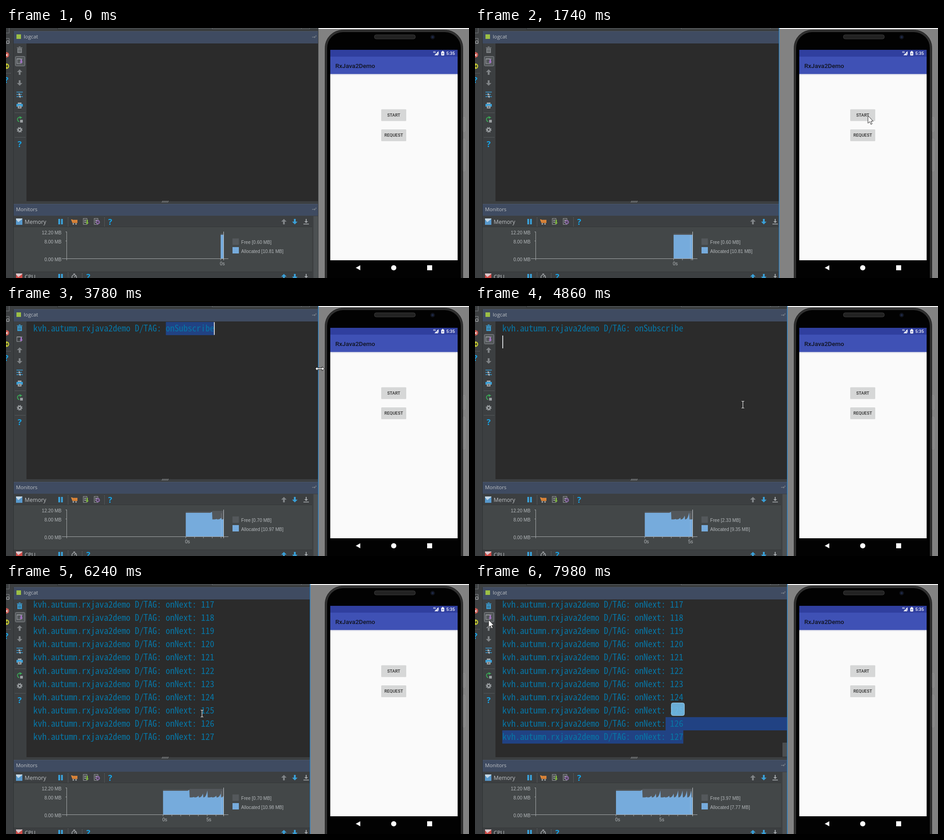
Recreate the animation shown at these times as an HTML page. Size 1018 by 550 pixels, loop 8 s.

```html
<!DOCTYPE html>
<html lang="en">
<head>
<meta charset="utf-8">
<title>Logcat and emulator</title>
<style>
html, body { margin: 0; width: 100%; height: 100%; overflow: hidden; background: #3c3f41; }
svg { display: block; width: 1018px; height: 550px; }
text { white-space: pre; }
.ui { font-family: "Open Sans", "Noto Sans", sans-serif; fill: #bfc3c6; }
.num { font: 10.1px "Liberation Sans", Arial, sans-serif; fill: #b4b8bb; }
.app { font-family: Roboto, sans-serif; font-weight: 500; }
.log { font-family: "Noto Sans Mono CJK SC", "Noto Sans Mono", "Liberation Mono", monospace; fill: #0776a6; }
</style>
</head>
<body>
<svg id="stage" viewBox="0 0 1018 550"></svg>
<script>
const LOOP = 8000, STEP = 60;
const BLUE = '#3a9fd6', GREY = '#7f8386', PALE = '#a4a8ab';
const stage = document.getElementById('stage');

const rect = (x, y, w, h, fill, more = '') =>
  `<rect x="${x}" y="${y}" width="${w}" height="${h}" fill="${fill}" ${more}/>`;
const disc = (x, y, r, fill, more = '') =>
  `<circle cx="${x}" cy="${y}" r="${r}" fill="${fill}" ${more}/>`;
const shape = (d, fill, more = '') => `<path d="${d}" fill="${fill}" ${more}/>`;
const line = (d, color, w = 1, more = '') =>
  `<path d="${d}" fill="none" stroke="${color}" stroke-width="${w}" ${more}/>`;
const text = (x, y, str, cls, more = '') => `<text x="${x}" y="${y}" class="${cls}" ${more}>${str}</text>`;
const at = (x, y, body, more = '') => `<g transform="translate(${x} ${y})" ${more}>${body}</g>`;

// Icons, each drawn around its own centre
const arrow = (x, y, dir, color) =>
  at(x, y, shape('M0-6L6 0H2V6H-2V0H-6Z', color, dir < 0 ? 'transform="scale(1 -1)"' : ''));
const help = (x, y) => text(x, y + 6.5, '?', 'ui',
  `text-anchor="middle" style="fill:#16a4e8;font-weight:700;font-size:18px"`);
const pause = (x, y) => rect(x - 5, y - 6, 4, 12, BLUE) + rect(x + 1, y - 6, 4, 12, BLUE);
const dots = (d) => line(d, '#85898c', 1, 'stroke-dasharray="1 2"');
const hide = (x, y) => at(x, y, line('M-5 0H2M0-2L2 0L0 2M3.5-4V-1', '#8d9398'));
const save = (x, y) => at(x, y, shape('M-1-6H1V-1H4L0 3L-4-1H-1Z', PALE) + line('M-6 5.3H6', PALE, 1.6));
const wave = (x, y, color) =>
  rect(x - 7, y - 7, 14, 14, color) + at(x, y, shape('M-7-5L-2 1L2-2L7-6V-7H-7Z', '#dfe6ec', 'opacity=".8"'));
const sheet = (x, y, extra) => at(x, y,
  rect(-5, -7, 8, 13, 'none', `stroke="${PALE}"`) + rect(-3, -4, 4, 2, PALE) + rect(-3, 0, 4, 2, PALE) + extra);
const trash = at(30, 48,
  line('M-6-4.5H6M-2-6.5H2', 'currentColor', 1.5) + shape('M-5-3H5V7H-5Z', 'currentColor') +
  line('M-2.2-1V5M0-1V5M2.2-1V5', '#3c3f41', .8));

function leftEdge() {
  return rect(0, 0, 16, 550, '#3c3f41') +
    rect(-3, -2, 10, 13, 'none', 'stroke="#777b7e"') +
    rect(-2, 23, 9, 11, 'none', 'stroke="#8a8e91"') + disc(4, 31, 3, '#3c3f41', 'stroke="#c0c3c5"') +
    disc(1, 59, 6, '#c9564e') + line('M-1 57L4 62M4 57L-1 62', '#f2dcda', 1.3) +
    disc(1, 84, 6, '#c3c832') + line('M-2 84H5M3 81V87', '#34372b', 1.5) +
    dots('M0 99.5h11') + help(1, 114);
}

function logTools() {
  return rect(17, 34, 28, 347, '#3c3f41') +
    `<g id="trash">${trash}</g>` +
    rect(20.5, 62.5, 21, 21, '#53575a', 'rx="2" stroke="#888c8f" id="toggle"') +
    at(30, 73, rect(-6, -5, 9, 10, 'none', `stroke="${PALE}"`) + line('M-6-5H6', PALE) +
      shape('M2-4H5V1H7L3.5 5L0 1H2Z', '#a675c8')) +
    arrow(30, 97, 1, GREY) + arrow(30, 121, -1, GREY) +
    at(30, 146, line('M-7-5H7M-7 0H5M-7 5H7', BLUE, 1.6) + shape('M-2-3L2 0L-2 3Z M2 2L-2 5L2 8Z', '#b7bcc0')) +
    at(30, 170, rect(-4, -6, 8, 3, PALE) + rect(-7, -3, 14, 6, BLUE) + rect(-4, 1, 8, 6, PALE) + rect(-2, 3, 4, 2, '#55595c')) +
    dots('M20 186.5h22') +
    at(30, 201, line('M3-4A5 5 0 1 0-1 5', '#3aa655', 2) + shape('M0-7L6-4L0-1Z', '#3aa655') + rect(1, 1, 6, 6, '#9a9ea1')) +
    at(30, 224, disc(0, 0, 3.3, 'none', 'stroke="#9da1a4" stroke-width="2.6"') +
      disc(0, 0, 5.3, 'none', 'stroke="#9da1a4" stroke-width="2" stroke-dasharray="2 2.16"')) +
    dots('M20 240.5h22') + help(30, 255);
}

function header(y, name, color, arrowColor) {
  return wave(29, y, color) + text(41, y + 4.8, name, 'ui', 'font-size="12.1"') + pause(120, y) +
    dots(`M136.5 ${y - 9}v19`) + arrow(611, y, 1, arrowColor) + arrow(635, y, -1, BLUE) + save(660, y);
}

function chart() {
  const scale = [['12.20', 454], ['8.00', 473.5], ['0.00', 512.5]];
  return scale.map(([mb, y]) => text(122, y, mb + ' MB', 'num', 'text-anchor="end"')).join('') +
    '<g clip-path="url(#plot)"><path id="free" fill="#53575b"/><path id="alloc" fill="#76abdc"/></g>' +
    line('M473.5 456V507', '#fff', 1, 'opacity=".2" id="mark"') +
    line('M131 448.5H134M131 468.5H134M133.5 448V511M123 507.5H489', PALE) +
    line('M478.5 448V511', '#c2c7cb') + line('', PALE, 1, 'id="ticks"') +
    text(0, 521.5, '0s', 'num', 'id="sec0" text-anchor="middle"') +
    text(0, 521.5, '5s', 'num', 'id="sec5" text-anchor="middle"') +
    rect(498, 463, 14, 14, '#54585b') + rect(498, 482, 14, 14, '#76abdc') +
    text(517, 475, '', 'num', 'id="freeText"') + text(517, 494.7, '', 'num', 'id="allocText"');
}

function monitors() {
  let grip = '';
  for (let x = 343; x < 357; x += 3) grip += `M${x} 384l2-4`;
  return rect(17, 381, 669, 6, '#3c3f41') + line(grip, '#b5b8ba', .9) +
    rect(17, 387, 669, 26, '#3f4b61') + line('M17 387.5H686', '#4b576c') +
    text(22, 402.5, 'Monitors', 'ui', 'font-size="11.2"') + hide(678, 399) +
    rect(17, 413, 669, 137, '#3c3f41') + rect(17, 438, 656, 98, '#434748') +
    line('M17 437.5H673M17 536.5H673', '#343738') + rect(676, 414, 10, 136, '#4c5052') +
    header(426, 'Memory', '#5899cc', GREY) +
    at(150, 426, shape('M-7-5H-4V-4H7V3H-4Z', '#e08a3c') + line('M-2-4V3M1-4V3M4-4V3', '#b9682a', .8) +
      disc(-2, 5, 1.6, '#b9bcbe') + disc(4, 5, 1.6, '#b9bcbe')) +
    sheet(175, 426, shape('M2-4H5V2H7L3.5 6L0 2H2Z', '#7fb83f')) +
    sheet(199, 426, disc(3, 1, 3.6, '#3c3f41', 'stroke="#a675c8" stroke-width="1.6"') + line('M3-1V1H5', '#a675c8')) +
    dots('M216.5 417v19') + help(229, 426) +
    header(547, 'CPU', '#cf4b47', BLUE) +
    at(150, 547, disc(0, 1, 5, 'none', `stroke="${PALE}" stroke-width="1.6"`) + line('M-2-6H2M0 1L3-2', PALE, 1.5)) +
    dots('M167.5 540v10') + help(181, 547) + chart();
}

function ide() {
  return rect(0, 0, 687, 550, '#3c3f41') +
    rect(113, 0, 573, 3, '#45494b') + line('M113.5 0V3.5H686', '#2b2d2e') +
    rect(453.5, -4, 214, 6, '#3c3f41', 'stroke="#6a6e70"') + line('M649.5 0V2', '#6a6e70') +
    rect(17, 7, 669, 27, '#3f4b61') + line('M17 7.5H686', '#4b576c') +
    rect(23, 14, 10, 10, '#9cbf45') +
    text(39, 23.3, 'logcat', 'ui', 'font-size="11.3"') + hide(678, 20) +
    rect(45, 34, 641, 347, '#2b2b2b') + logTools() +
    '<g clip-path="url(#pane)"><g id="marks"></g><g id="log"></g></g>' +
    rect(676, 349, 10, 31, '#4b4e50', 'id="thumb"') +
    rect(431.5, 261.5, 29, 28, '#73bce9', 'rx="4" stroke="#a9d8f4" id="popup"') +
    monitors() + leftEdge() + line('M16.5 7V550', '#2e3133');
}

function button(y, label) {
  return rect(825, y + 1, 55, 25, '#000', 'rx="1.5" opacity=".14"') + rect(825, y, 55, 24.5, '#d6d7d7', 'rx="1.5"') +
    text(852.5, y + 15.7, label, 'app', 'font-size="9.5" text-anchor="middle" fill="#2b2b2b"');
}

function phone() {
  const side = (y, h) => rect(1005.5, y, 3, h, '#767676', 'rx="1" stroke="#a3a3a3"');
  return side(196.5, 31) + side(244.5, 70) +
    rect(701.5, 4.5, 303, 600, '#303030', 'rx="39" stroke="#1c1c1c"') +
    rect(706, 9, 294, 600, '#020202', 'rx="35"') +
    rect(810, 15, 90, 9, '#222', 'rx="4" stroke="#3c3c3c"') +
    disc(938, 20, 5, '#10131c') + disc(938, 20, 2.5, '#1d2744') +
    rect(713, 48, 280, 15, '#303f9f') + rect(713, 63, 280, 38, '#3f51b5') +
    rect(713, 101, 280, 410, '#fafafa') + rect(713, 101, 280, 1.5, '#bfc3dc') + rect(713, 102.5, 280, 1.5, '#ececf3') +
    text(724, 87.6, 'RxJava2Demo', 'app', 'font-size="13.6" fill="#10131f"') +
    text(939, 55, '4G', 'app', 'font-size="5" fill="#fff"') +
    shape('M951 51V60H942Z', '#fff') + line('M947 55L951 60', '#303f9f') +
    rect(957, 52, 6.5, 8.5, '#fff', 'rx="1"') + rect(959, 50.5, 2.5, 2, '#fff') + rect(959, 55, 2.5, 3, '#7f88c6') +
    text(968, 59, '5:35', 'app', 'font-size="9.7" fill="#fff"') +
    button(178.8, 'START') + button(223, 'REQUEST') +
    shape('M769 527.5L779 522V533Z', '#fff') + disc(852.5, 527.5, 5.7, '#fff') + rect(926, 522, 11, 11, '#fff');
}

const cursors = {
  arrow: shape('M0 0V16.5L3.8 12.9L6.5 19L9.2 17.8L6.6 12H11.5Z', '#fff', 'stroke="#222"'),
  beam: line('M-3-7.5H-1L0-6.5L1-7.5H3M0-6.5V6.5M-3 7.5H-1L0 6.5L1 7.5H3', '#e6e6e6', 1.2),
  size: shape('M-10 0L-5-4.5V-1.5H5V-4.5L10 0L5 4.5V1.5H-5V4.5Z', '#fff', 'stroke="#111"')
};

stage.innerHTML =
  `<defs><clipPath id="plot">${rect(134, 440, 345, 67)}</clipPath>
  <clipPath id="pane">${rect(45, 34, 641, 347)}</clipPath></defs>` +
  ide() + rect(0, 0, 360, 550, '#828282', 'id="back"') + rect(0, 0, 360, 2, '#fff', 'id="top"') + phone() +
  rect(0, 0, 1.2, 550, '#1b82d2', 'id="rim"') + '<g id="mouse"></g>';

const $ = id => document.getElementById(id);
const set = (id, attrs) => { for (const k in attrs) $(id).setAttribute(k, attrs[k]); };
const show = (id, on) => set(id, { visibility: on ? 'visible' : 'hidden' });
const last = (list, t) => list.filter(e => e[0] <= t).pop();

// Log text: the font size follows from the width of one character
const CELL = 9.71, ROW = 29.1, LEFT = 60;
const ruler = document.createElement('canvas').getContext('2d');
ruler.font = '100px "Noto Sans Mono CJK SC", "Noto Sans Mono", "Liberation Mono", monospace';
const logSize = CELL / ruler.measureText('m').width * 100;
const logLine = (mid, msg) =>
  text(LEFT, mid + 6.5, 'kvh.autumn.rxjava2demo D/TAG: ' + msg, 'log', `font-size="${logSize.toFixed(3)}"`);
const firstLog = logLine(49.5, 'onSubscribe');
const fullLog = Array.from({ length: 11 }, (_, i) => logLine(45.5 + i * ROW, 'onNext: ' + (117 + i))).join('');

// Places where the mouse rests: arrival, departure, x, y
const stops = [
  [0, 60, 1010, 97], [780, 2160, 864, 193], [3000, 3360, 420, 52], [3780, 4200, 690, 138],
  [4440, 4440, 825, 190], [4800, 5040, 589, 217], [5460, 5700, 862, 239], [6240, 6240, 431, 285],
  [6420, 6600, 460, 338], [6900, 7020, 420, 309], [7320, 7320, 486, 311], [7500, 7560, 573, 312], [7980, LOOP, 30, 79]
];
function pointer(t) {
  const i = stops.findIndex(s => s[0] > t);
  const [, t0, x0, y0] = stops.at(i < 0 ? -1 : i - 1);
  if (i < 0 || t <= t0) return [x0, y0];
  const [t1, , x1, y1] = stops[i];
  const k = (1 - Math.cos(Math.PI * (t - t0) / (t1 - t0))) / 2;
  return [x0 + (x1 - x0) * k, y0 + (y1 - y0) * k];
}

// Memory in MB, by pixels since the first sample: level, one collection, then growing teeth
const DROP = 58.5, TOOTH = 9.75;
function used(x) {
  if (x < DROP) return 10.85 + Math.max(0, x - 54) * .1;
  const n = Math.ceil((x - DROP) / TOOTH) || 1, phase = (x - DROP) / TOOTH - n + 1;
  const size = n > 4 ? Math.min(1, (n - 4) / 4) : n / 4;
  return 7.8 + 3.2 * size ** 2 * phase ** 3;
}
const total = x => x < DROP ? 11.42 : 11.7;
// Legend: time, free MB, allocated MB
const legend = [
  [0, .6, 10.81], [2700, 3.86, 7.81], [3720, .7, 10.97], [4740, 2.33, 9.35],
  [6180, .7, 10.98], [7200, 3.05, 8.69], [7680, 3.97, 7.77]
];

function area(curve, x0) {
  let d = `M${x0} 507`;
  for (let x = 0; x0 + x < 480; x += .75) d += `L${x0 + x} ${507 - curve(x) * 4.8}`;
  return d + 'V507Z';
}

function drawChart(t) {
  const x0 = 472 - t * .0203;
  set('free', { d: area(total, x0) });
  set('alloc', { d: area(used, x0) });
  let d = '';
  for (let x = x0; x < 479; x += 19.4) d += `M${x} 507V511`;
  set('ticks', { d });
  set('sec0', { x: x0 + 3.7 });
  set('sec5', { x: x0 + 100.7 });
  show('sec5', x0 + 97 < 479);
  show('mark', t > 120);
  const [, free, alloc] = last(legend, t);
  $('freeText').textContent = `Free [${free.toFixed(2)} MB]`;
  $('allocText').textContent = `Allocated [${alloc.toFixed(2)} MB]`;
}

function drawLog(t, emulator) {
  $('log').innerHTML = t >= 5640 ? fullLog : t >= 1920 ? firstLog : '';
  const top = r => 31 + r * ROW;
  const sel = (x, y, w) => rect(x, y, w, ROW, '#214283');
  let s = '', caret = null;
  if (t >= 3300 && t < 4740) {
    s = sel(351.5, 35, 106.5);
    caret = [458, 35, 3300];
  } else if (t >= 4740 && t < 5580) {
    caret = [61, 64.5, 4740];
  } else if (t >= 6840) {
    s = sel(419, top(9), 267) + sel(LEFT, top(10), 398);
    caret = [419, top(9), 7000];
  } else if (t >= 6480) {
    const x = 458 - CELL * Math.max(0, Math.floor((t - 6600) / STEP));
    s = sel(x, top(10), 458 - x);
    caret = [x, top(10), 6480];
  }
  if (caret && !emulator && (t < caret[2] || (t - caret[2]) % 1000 < 500))
    s += rect(caret[0] - 1, caret[1] + .5, 2, ROW - 1, '#d0d3d6');
  $('marks').innerHTML = s;
  show('thumb', t >= 5640);
  show('popup', t >= 7080);
  set('popup', { opacity: Math.min(1, 1 - .1 * (t - 7320) / 660) });
  set('trash', { color: t >= 3420 ? BLUE : GREY });
  show('toggle', t < 3420 || (t >= 4740 && t < 6840) || t >= 7920);
}

function drawMouse(t, emulator) {
  show('mouse', t >= 60);
  const [x, y] = pointer(t);
  let kind = 'beam';
  if (x < 45 || x > (emulator ? 669 : 687) || (t >= 6900 && x > 419 && y > 293)) kind = 'arrow';
  if (t >= 3420 && !emulator && Math.abs(x - 689) < 6) kind = 'size';
  set('mouse', { transform: `translate(${x} ${y})` });
  $('mouse').innerHTML = cursors[kind];
}

function draw(time) {
  const t = Math.floor(time % LOOP / STEP) * STEP;
  const emulator = (t >= 1740 && t < 3120) || (t >= 5580 && t < 6480);
  const edge = emulator ? 669 : 687;
  set('back', { x: edge });
  set('top', { x: edge });
  set('rim', { x: edge - 1 });
  show('rim', t >= 1740);
  drawChart(t);
  drawLog(t, emulator);
  drawMouse(t, emulator);
}

const start = performance.now();
function tick() {
  draw(performance.now() - start);
  requestAnimationFrame(tick);
}
tick();
</script>
</body>
</html>
```
